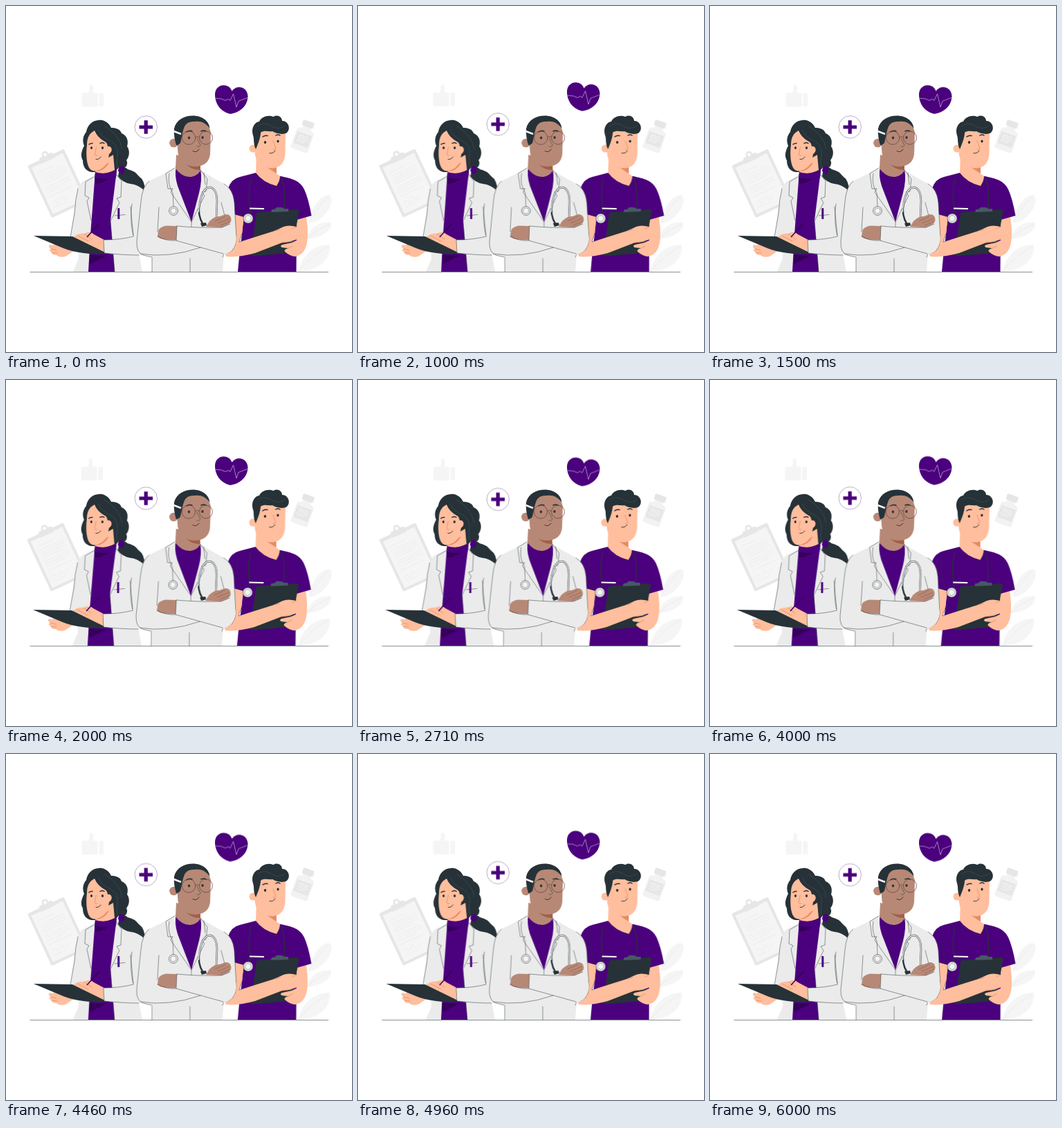
An HTML page without scripts for the animation above (6.04 s loop, 500 px wide and 500 px high).

```html
<!DOCTYPE html>
<html lang="en">
<head>
<meta charset="utf-8">
<title>Medical team</title>
<style>
  html, body { margin: 0; width: 100%; height: 100%; overflow: hidden; background: #fff; }
  svg { display: block; width: 100vw; height: 100vh; }
  .purple { fill: #4b007d; }
  .deep { fill: #35005a; }
  .dark { fill: #263238; }
  .skin { fill: #ffbe9d; }
  .brown { fill: #b78876; }
  .coat { fill: #ebebeb; }
  .pale { fill: #f5f5f5; }
  .grey { fill: #e6e6e6; }
  .ink, .soft, .vein, .nose, .wave { fill: none; stroke-linecap: round; stroke-linejoin: round; }
  .ink { stroke: #263238; stroke-width: .5; }
  .soft { stroke: #e6e6e6; stroke-width: .6; }
  .vein { stroke: #e6e6e6; stroke-width: .6; }
  .nose { stroke: #e58b64; stroke-width: .8; }
  .wave { stroke: #fff; stroke-width: .5; }
  .brow { stroke-width: 1.5; }
  .smile { stroke-width: .9; }
  .tube { stroke-width: 1.2; }
  .rim { stroke-width: 2.4; }
  .core { stroke: #ebebeb; stroke-width: 1.4; }
  .float { animation: float 1510ms linear infinite; }
  .drift { animation: drift 1510ms linear infinite; }
  .team { transform-origin: 250px 165px; animation: sway 6040ms linear infinite; }
  @keyframes float { 50% { transform: translateY(-6.2px); } }
  @keyframes drift { 50% { transform: translate(-1.5px, -.6px); } }
  @keyframes sway {
    0%, 50%, 100% { transform: skewX(0deg); }
    12.5%, 87.5% { transform: skewX(.48deg); }
    37.5%, 62.5% { transform: skewX(-.48deg); }
  }
</style>
</head>
<body>
<svg viewBox="0 0 500 500">
  <!-- backdrop -->
  <g class="drift">
    <path class="pale" d="M109.500 128q0-2.500 2.500-2.500h7.500q1.500-4 1-8.500q.5-3 3-3q3 .5 2.800 6l-.3 5.500h5.500q1.500.5 1 3v14q0 3-3 3h-17q-3 0-3-3zM134.500 126h5q1.500 0 1.500 1.500v16q0 1.500-1.500 1.500h-5z"/>
    <g transform="translate(31 231) rotate(-25)">
      <rect class="grey" width="58" height="83" rx="2"/>
      <rect class="pale" x="4" y="5" width="50" height="74"/>
      <path class="grey" d="M19 6V0q0-3 4-3h2q0-6 5-6t5 6h2q4 0 4 3v6z"/>
      <circle cx="30" cy="-4" r="2.300" fill="#fff"/>
      <path class="soft" d="M10 16h24M10 22h38M10 26h38M10 30h38M10 34h32M10 40h38M10 44h38M10 48h28M10 54h36M10 66q4-8 6-1t6-2q4-5 5 2t8-1M10 71h18"/>
    </g>
  </g>
  <g transform="translate(436.500 171.300) rotate(20)">
    <path d="M-6 3H6V7Q13 8 13 13V37Q13 40 10 40H-10Q-13 40-13 37V13Q-13 8-6 7z" fill="#f2f2f2"/>
    <rect class="grey" x="-8.500" y="-5" width="17" height="9" rx="2"/>
    <rect class="grey" x="-11" y="14" width="22" height="18"/>
    <path d="M-8 18H8M-8 21H8M-8 24H8M-8 27H4" stroke="#f5f5f5" fill="none"/>
  </g>
  <path class="pale" d="M438 313C440 295 452 274 466 273C474 275 471 291 461 301C452 310 444 314 438 313zM434 337C438 322 452 310 470 313C471 325 456 335 434 337zM423 382C427 362 444 344 468 345C470 364 455 382 423 384z"/>
  <path class="vein" d="M438 313Q450 290 466 275M434 337Q450 322 468 315M424 382Q440 361 466 347"/>

  <g class="float">
    <circle cx="202.300" cy="175" r="16.200" fill="#fff" stroke="#4b007d" stroke-width=".35"/>
    <path class="purple" d="M199.600 165.300h5.200v7.100h7.200v5.200h-7.200v7.200h-5.200v-7.200h-7.100v-5.200h7.100z"/>
  </g>
  <g class="float">
    <path class="purple" d="M324 156C311 153 302 142 302 128C302 112 322 110 326.500 123C333 113 350 116 349.500 132C348 146 337 154 324 156z"/>
    <path class="wave" d="M303 133.500L311 134L317 136.500L321 134.500L324 136.500L328.500 127L333 146L336 137.500L349 132.500"/>
  </g>

  <g class="team">
    <!-- nurse -->
    <path class="skin" d="M418 306L434 305Q438 332 434 346Q428 354 424 352L416 332z"/>
    <path class="purple" d="M361 241L338 247Q325 250 321 264L327 302L343 307L341 330L338 352L335 384H419.500L420 309L441.500 303Q437 278 431 265C425 252 412 249 397 246z"/>
    <path class="ink" d="M351 268Q355 285 353 300M420 309L415 285M335 253Q332 280 343 307"/>
    <path class="skin" d="M362 210L361 241Q371 255 391 260Q396 252 396 246L391 242V226z"/>
    <path class="ink" d="M359 243Q372 258 391 263L398 248"/>
    <path d="M376 232Q387 240 391 242V230z" fill="#e58b64"/>
    <circle class="skin" cx="357" cy="206" r="5.500"/>
    <path class="skin" d="M362 186Q357 212 362 222Q371 234 385 234.500Q402 233 403.500 214L404 184Q382 174 366 183z"/>
    <path class="dark" d="M361 207C357 199 359 192 357 187C354 178 358 168 366 167C369 160 379 157 386 160C392 156 399 160 399 166C408 166 412 177 406 183C400 187 390 184 385 181C379 182 373 179 368 183C368 190 364 200 361 207z"/>
    <path d="M363 174Q373 166 383 173T403 173" fill="none" stroke="#455a64" stroke-width=".5"/>
    <path class="ink brow" d="M371 189q3-2.500 7-1.500M390 187q3-2 6 0"/>
    <ellipse class="dark" cx="374.500" cy="197" rx="1.700" ry="2.100"/>
    <ellipse class="dark" cx="393" cy="195.500" rx="1.600" ry="2.100"/>
    <path class="nose" d="M386 195L390 206Q389 208 386 207"/>
    <path class="ink smile" d="M381 212.500Q386 214 389 209"/>
    <path class="ink tube" d="M354 249Q349 268 353 300M398 249Q404 264 402 292"/>
    <path d="M352 292.500L373 293" stroke="#fff" stroke-width="1.800"/>
    <path class="dark" d="M365 298L421 294Q424 294 423.500 297L413 354Q412 357 409 357L356 361.500Q353 361 354 358L362 300Q363 298 365 298z"/>
    <path d="M383 298l1-4q5 0 6-2t7-1q4 0 5 2l6 0v4z" fill="#455a64"/>
    <path class="skin" d="M326 300L344 305L341 329L337 341L388 325L401 319Q408 316 420 319L424 336L409 341L399 342L360 357Q335 364 318 362L312 345z"/>
    <path class="ink" d="M341 329L337 341L360 333"/>
    <circle cx="350" cy="307" r="7" fill="#e0e0e0" stroke="#263238" stroke-width=".5"/>
    <circle cx="350" cy="307" r="4.300" fill="#f5f5f5" stroke="#777" stroke-width=".5"/>
    <path class="skin" d="M433 336Q422 337 413 342L399 345Q395 347 399 349L408 350Q401 352 403 355Q411 362 418 362Q430 360 434 346z"/>
    <path class="nose" d="M408 350L414 347M420 319L414 322M388 325L396 323M399 342L413 340"/>

    <!-- doctor with open clipboard -->
    <path class="coat" d="M128 245L113 252Q104 257 102 272L93 334L104 338L105 365L97 384H197L192 358L200 262Q195 254 182 249L160 243z"/>
    <path class="dark" d="M164 235Q172 231 176 236Q186 238 192 246Q201 252 201 267.500Q191 258 180 257Q168 255 162 246z"/>
    <path class="purple" d="M129 240L128 252L125 292L122 330L119 384H157L151 310L157 262L160 238z"/>
    <path class="deep" d="M128 248Q142 252 153 246Q143 255 129 257z"/>
    <path class="deep" d="M121 359Q135 362 149 359L121 373z"/>
    <path class="ink" d="M127 247L115 254L114 274L120 277L117 282L123 310M160 244L167 253L166 276L160 278L164 284L151 311M104 264Q100 280 99 300L93 334M182 286Q178 310 185 337M151 311L157 384"/>
    <path class="ink" d="M157 303L172 301.500"/>
    <rect class="purple" x="161.300" y="292" width="3" height="16" rx="1"/>
    <path class="dark" d="M134 165C124 165 117 174 116 182C111 188 110 195 113 202C108 211 108 218 111 223C111 233 116 239 124 240L155 240C159 239 161 236 163 233C171 239 178 229 174 223C179 217 179 208 175 203C178 193 173 186 167 184C165 177 157 176 152 176C148 168 141 164 134 165z"/>
    <path class="skin" d="M127 231L130 242Q144 244 157 237L155 215z"/>
    <path d="M129 239Q142 239 149 226L133 235z" fill="#e58b64"/>
    <path class="skin" d="M128 180C120 184 117 191 117 201C115 216 117 230 121 235C126 242 139 238 147 226L149 214C156 209 152 201 147 203Q146 197 143 196Q132 190 128 180z"/>
    <path class="purple" d="M129 240Q145 245 160 236L159 248Q142 252 128 248z"/>
    <path d="M133 178Q138 190 151 195Q163 201 161 216T162 232M142 173Q165 187 168 207" fill="none" stroke="#455a64" stroke-width=".5"/>
    <path class="purple" d="M163 233q5-4 8 1q2 5-3 9q-5-1-6-5z"/>
    <path class="ink brow" d="M120 200q2-2 5-1.500M136 198.500q3-2 6 0"/>
    <ellipse class="dark" cx="123.500" cy="205" rx="1.500" ry="2"/>
    <ellipse class="dark" cx="139.500" cy="205" rx="1.600" ry="2"/>
    <path class="nose" d="M130.500 204L128 215Q129 217 132 216"/>
    <path class="ink smile" d="M130 221.500Q135 222 137 218"/>
    <path class="skin" d="M95 341L79 340Q71 341 68 346L63 345Q60 348 65 351Q60 353 66 356Q66 360 73 360Q77 364 86 362Q94 357 100 352z"/>
    <path class="nose" d="M65 351L73 353M66 356L74 357"/>
    <path class="skin" d="M97 334Q104 328 113 329Q121 324 127 330L142 338L143 356Q131 353 123 347z"/>
    <path class="nose" d="M104 332L119 340M113 329L124 337"/>
    <path class="dark" d="M40 332L96 333L146 357.500Q136 360 112 357Q95 355 83 350z"/>
    <path d="M135 314L117 334" stroke="#35005a" stroke-width="1.500"/>
    <path class="coat" d="M141 338Q165 338 184 332L193 350L192 361Q165 360 142 357z"/>
    <path class="ink" d="M184 333Q165 338 141 338L142 357Q170 360 192 360M180 290L184 331"/>

    <!-- doctor with folded arms -->
    <path class="coat" d="M244 234L231 241L207 253Q197 260 195 283L189 340Q188 356 198 360L211 363V384H313L315 358Q330 357 333 337L330 284Q328 264 315 257L290 243L281 237L267 312z"/>
    <path class="purple" d="M246 232Q243 244 248 260L268 312L279 270Q284 251 281 236z"/>
    <path class="brown" d="M246 215L245 235Q255 248 267 247Q276 246 281 238V224z"/>
    <path d="M258 226Q268 238 281 237V226z" fill="#a45f48"/>
    <circle class="brown" cx="242.500" cy="198" r="6.300"/>
    <path class="brown" d="M249 182Q246 206 250 219Q258 232 274 232Q293 231 295 214L296 183Q293 166 272 164Q258 164 252 174z"/>
    <path class="dark" d="M246 201Q242 188 243 177C246 164 258 158.500 270 158.500C284 158.500 294 167 294.500 177C288 168 281 166 273 167Q262 166 258 174Q256 179 255 184L252 198L248 201z"/>
    <path d="M242.500 181L253 185" stroke="#f5f5f5" stroke-width="2.600"/>
    <path class="ink brow" d="M261 182q4-3 8-1M282 181q4-2 7 0"/>
    <g fill="none" stroke="#5b4038" stroke-width=".7">
      <circle cx="264" cy="190.500" r="9.700"/><circle cx="289" cy="190.500" r="9.500"/><path d="M273.500 190q3-3 6 0"/>
    </g>
    <ellipse class="dark" cx="264.500" cy="190.500" rx="1.600" ry="2.100"/>
    <ellipse class="dark" cx="284" cy="190" rx="1.600" ry="2.100"/>
    <path class="ink" d="M276 191L281 201Q280 204 276 203"/>
    <path class="ink smile" d="M270 209.500Q275 213 279 207"/>
    <path class="ink" d="M244 234L231 242L234 264L241 264L238 269L268 312M281 237L291 250L289 268L283 269L287 274L268 312V320M207 253Q197 260 195 283L189 340Q188 356 198 360L211 363M315 257Q328 264 330 284L333 337Q331 357 315 358L313 363M221 291L219 326M311 284L316 303"/>
    <path class="ink" d="M236 242Q233 257 241 270L242 289M286 241L288 258"/>
    <circle cx="242" cy="296" r="6.500" fill="#dedede" stroke="#455a64" stroke-width=".6"/>
    <circle cx="242" cy="296" r="4" fill="#f5f5f5" stroke="#777" stroke-width=".5"/>
    <g id="tube">
      <path class="ink rim" d="M285 316Q276 302 280 285Q284 262 295 262Q305 264 305 283L304 306"/>
      <path class="ink core" d="M278.500 297Q278 292 280 285Q284 262 295 262Q305 264 305 283L304 306"/>
    </g>
    <path class="dark" d="M281 314l8-1l1 4l-7 2z"/>
    <path class="brown" d="M248 318L231 317.500Q220 320 220 326L219 333Q224 339 248 338z"/>
    <path class="brown" d="M289 319L294 311Q302 303 309 304L317 301Q324 301 325 306Q327 311 321 316L312 320z"/>
    <path d="M302 311L317 304M306 314L323 307M310 317L325 311" fill="none" stroke="#8e5948" stroke-width=".6"/>
    <path class="coat" d="M247 318Q275 320 312 320L330 312L333 337Q330 357 314 359L246 339z"/>
    <path class="ink" d="M247 318Q278 321 312 320L324 315M247 318L246 339L314 358M219 333Q232 340 246 339M194 358Q235 365 281 349M211 364V384M266 365V384"/>
  </g>
  <path d="M34.500 384.400H466" stroke="#263238" stroke-width=".6"/>
</svg>
</body>
</html>
```
